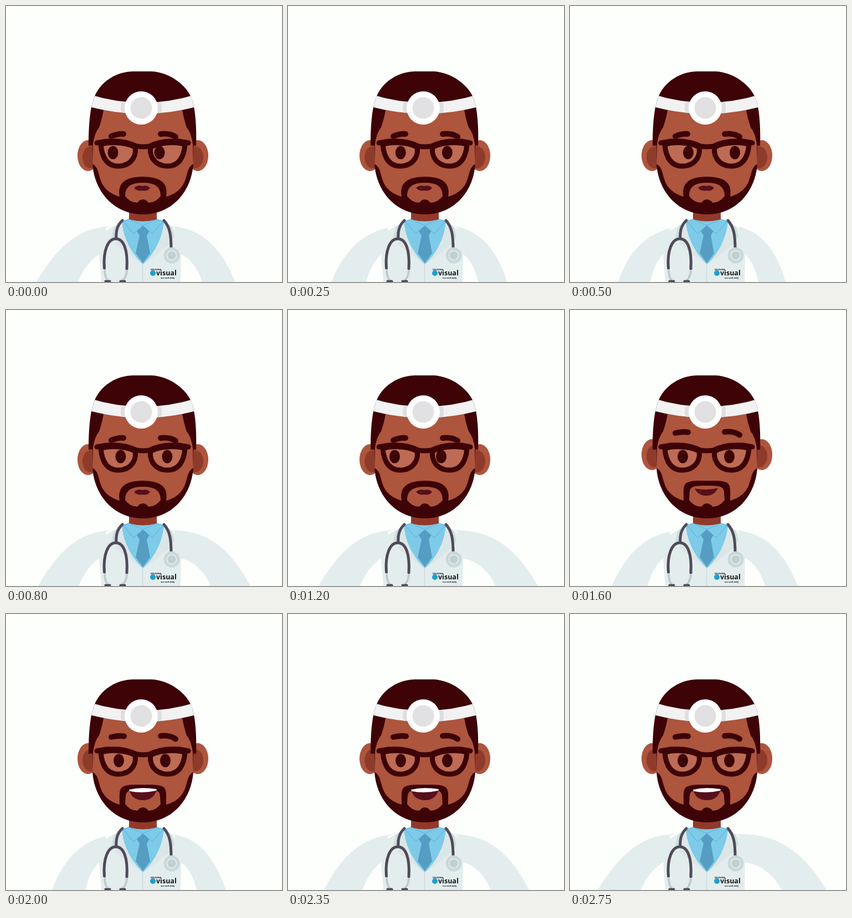
Write an HTML page that moves like this. It is 498 px wide and 498 px high and loops after 2.8 s.

```html
<!DOCTYPE html>
<html lang="en">
<head>
<meta charset="utf-8">
<title>Eye doctor</title>
<style>
  html, body { margin: 0; width: 100%; height: 100%; overflow: hidden; background: #fdfffd; }
  svg { display: block; width: 498px; height: 498px; }
  .coat { fill: #e4eded; }
  .lapel { fill: #dbe6e7; }
  .fold { fill: #cfdedf; }
  .bg { fill: #fdfffd; }
  .skin { fill: #ad553d; }
  .shade { fill: #8f3b2b; }
  .dark { fill: #3d0306; }
  .line { fill: none; stroke: #3d0306; stroke-linecap: round; stroke-linejoin: round; }
  .tube { fill: none; stroke: #504a59; stroke-width: 5; stroke-linecap: round; }
  text { font-family: "Open Sans", "Noto Sans", sans-serif; font-weight: 700; fill: #15181c; }
</style>
</head>
<body>
<svg viewBox="0 0 498 498">
  <defs>
    <clipPath id="headClip"><use href="#hair"/></clipPath>
    <clipPath id="bandClip"><use href="#band"/></clipPath>
    <clipPath id="mouthClip"><path id="mouthEdge"/></clipPath>
  </defs>

  <!-- body -->
  <path id="armL" class="coat"/>
  <path id="armR" class="coat"/>
  <path class="coat" d="M194 398L208 389H286L299 398L316 412V498H171L168 412Z"/>
  <path id="gapL" class="bg"/>
  <path id="gapR" class="bg"/>

  <!-- neck, shirt and tie -->
  <path fill="#7dcbe9" d="M209 390L222 384H272L285 389C282 420 268 447 247 466C226 446 212 420 209 390Z"/>
  <path fill="#93392a" d="M222 362H272V385Q247 392 222 385Z"/>
  <path fill="#559dc2" d="M233 402L247 396L261 402L254 414L260 446L247 464L234 446L241 414Z"/>
  <path fill="#7dcbe9" stroke="#62b0d3" d="M211 388L222 385L247 396L230 411ZM284 388L272 385L247 396L264 411Z"/>
  <path class="lapel" d="M208 389L195 398L190 417L201 421L197 429L246 467C226 446 212 420 208 389Z"/>
  <path class="lapel" d="M286 389L299 398L304 417L293 421L297 429L247 467C268 446 282 420 286 389Z"/>
  <path class="fold" d="M205 391L195 398L190 417L200 421Q198 404 205 391ZM289 391L299 398L304 417L295 421Q296 404 289 391Z"/>
  <path d="M246.500 466V498" stroke="#cbd8da" stroke-width="1.500"/>

  <!-- stethoscope -->
  <path class="tube" d="M210 387C201 395 198 407 199 420M177.500 473C175 441 184 420 198 420C213 420 220 441 218 474M285 387C296 399 298 415 298 438"/>
  <path fill="none" stroke="#bfcbd0" stroke-width="4" d="M178 475Q178 487 183 495M218 476Q218 487 211 495"/>
  <path class="tube" d="M180 497H187M207 497H214"/>
  <circle cx="299" cy="450" r="14.500" fill="#c9d8d9"/>
  <circle cx="299" cy="450" r="8.500" fill="#c0d1d3" stroke="#e0eaea" stroke-width="2"/>

  <!-- badge -->
  <circle cx="265" cy="482" r="5" fill="#1c9fd0"/>
  <text x="271" y="486" font-size="12.500">visual</text>
  <text x="261" y="477" font-size="4">VELDORA</text>
  <text x="279" y="492" font-size="3.800">see well daily</text>

  <!-- head -->
  <g id="ears">
    <ellipse class="skin" cx="148" cy="270" rx="19" ry="28"/>
    <ellipse class="skin" cx="346" cy="270" rx="19" ry="28"/>
    <ellipse class="shade" cx="153" cy="273" rx="15" ry="20"/>
    <ellipse class="shade" cx="341" cy="273" rx="15" ry="20"/>
  </g>
  <path id="hair" class="dark" d="M149 252C149 220 151 190 157 171C168 134 203 118 230 118H263C296 120 328 143 337 172C342 192 344 220 343 252Z"/>
  <path class="dark" d="M156 245H338V285C334 338 297 376 247 376C197 376 160 338 156 285Z"/>
  <path id="face" class="skin"/>
  <path id="patch" class="skin"/>
  <g clip-path="url(#headClip)">
    <path id="band" fill="#f2f2f3" d="M140 156Q247 193 354 156V179Q247 210 140 179Z"/>
    <circle cx="244" cy="184" r="37" fill="#dedee1" clip-path="url(#bandClip)"/>
  </g>
  <circle cx="244" cy="184" r="30" fill="#fefefe"/>
  <circle cx="244" cy="184" r="19.500" fill="#e1e1e4"/>

  <path id="brows" class="line" stroke-width="10"/>

  <!-- glasses and eyes -->
  <g id="lenses" fill="#bd6b54">
    <path d="M171 250C185 245 213 245 232 254C237 264 230 288 203 289C181 289 173 271 171 250Z"/>
    <path d="M323 250C309 245 281 245 262 254C257 264 264 288 291 289C313 289 321 271 323 250Z"/>
  </g>
  <g id="eyes" class="dark">
    <ellipse rx="9.500" ry="12" cy="264.500"/>
    <ellipse rx="9.500" ry="12" cx="84" cy="264.500"/>
  </g>
  <use href="#lenses" class="line" stroke-width="9" style="fill-opacity:0"/>
  <path class="line" stroke-width="9" d="M164 247L182 244Q215 242 235 253Q247 255 259 253Q279 242 312 244L329 247"/>

  <!-- mouth -->
  <path id="lips" fill="#57101b"/>
  <g clip-path="url(#mouthClip)">
    <path id="teeth" fill="#fdfdfd" d="M215 308H278V317Q247 326 215 318Z"/>
  </g>
</svg>

<script>
const LOOP = 2800, STEP = 50;
const $ = id => document.getElementById(id);
const draw = (id, d) => $(id).setAttribute('d', d);

// Blend two paths that share the same commands.
function mix(a, b, k) {
  const end = b.match(/-?[\d.]+/g);
  let i = 0;
  return a.replace(/-?[\d.]+/g, n => (+n + (end[i++] - n) * k).toFixed(2));
}

// Smooth curve through [time, value] keys, flat at turning points.
function curve(keys) {
  const slope = i => (keys[i + 1][1] - keys[i][1]) / (keys[i + 1][0] - keys[i][0]);
  const tangent = i => {
    if (!i || i === keys.length - 1) return 0;
    const a = slope(i - 1), b = slope(i);
    return a * b > 0 ? 2 * a * b / (a + b) : 0;
  };
  return t => {
    if (t >= keys[keys.length - 1][0]) return keys[keys.length - 1][1];
    const i = keys.findIndex(k => k[0] > t) - 1;
    const [t0, a] = keys[i], [t1, b] = keys[i + 1];
    const h = t1 - t0, s = (t - t0) / h, r = 1 - s;
    return a * (1 + 2 * s) * r * r + b * s * s * (3 - 2 * s)
      + h * s * r * (tangent(i) * r - tangent(i + 1) * s);
  };
}

const handL = curve([[0, 55], [400, 89], [500, 87], [800, 58], [1080, 51], [1200, 55],
  [1600, 76], [1850, 87], [2200, 73], [2350, 65], [2750, 50]]);
const handR = curve([[0, 414], [400, 387], [500, 389], [800, 441], [1050, 462], [1200, 451],
  [1600, 411], [1850, 388], [2200, 419], [2350, 435], [2750, 463]]);
const gaze = curve([[0, 193], [100, 193], [400, 213.5], [650, 213.5], [1050, 192.5], [1250, 192.5], [1500, 203.5]]);
const cheer = curve([[0, 0], [1250, 0], [1500, 1]]);
const open = curve([[0, 0], [1700, 0], [1950, 1]]);

const shape = {
  armL: ['M195 397C155 406 112 424 87 498L180 498L180 400Z', 'M195 397C150 397 104 410 50 498L180 498L180 400Z'],
  armR: ['M298 397C330 402 368 423 389 498L305 498L305 400Z', 'M298 397C345 397 405 401 463 498L305 498L305 400Z'],
  gapL: ['M168 448Q150 468 145 499L172 499Z', 'M168 448Q143 463 127 499L172 499Z'],
  gapR: ['M316 448Q332 462 340 499L315 499Z', 'M316 448Q360 455 382 499L315 499Z'],
  brows: ['M190 235Q202 230 212 231M279 231Q295 229 306 236', 'M190 222Q203 219 213 220.5M279 220Q295 218 306 225.5'],
  face: [
    'M176 188L318 188Q321 205 326 219Q335 230 337 250L338 285C328 290 327 303 324 312Q317 336 289 344C293 322 282 308 247 308C212 308 201 322 205 344Q177 336 170 312C167 303 166 290 156 285L157 250Q159 230 168 219Q173 205 176 188Z',
    'M176 188L318 188Q321 205 326 219Q335 230 337 250L338 285C328 290 327 303 324 312Q317 336 289 344C289 312 294 307 247 308C200 307 205 312 205 344Q177 336 170 312C167 303 166 290 156 285L157 250Q159 230 168 219Q173 205 176 188Z'],
  patch: [
    'M215 343C215 326 225 319 247 319C269 319 279 326 279 343Q270 355 257 355Q253 349 247 349Q241 349 237 355Q224 355 215 343Z',
    'M215 343C217 320 212 317 247 317C282 317 277 320 279 343Q270 355 257 355Q253 349 247 349Q241 349 237 355Q224 355 215 343Z']
};
const lips = [
  'M231 328Q239 322 246 325Q253 322 260 328Q256 335 246 333Q236 335 231 328Z',
  'M225 322Q236 324 246 324Q256 324 267 321Q261 335 246 335Q231 335 225 322Z',
  'M222 317Q235 314 247 314Q259 314 272 316Q267 336 247 336Q227 336 222 317Z'
];

function render(t) {
  const l = (87 - handL(t)) / 37, r = (handR(t) - 389) / 74;
  const c = cheer(t), o = open(t);
  const amount = { armL: l, gapL: l, armR: r, gapR: r, brows: c, face: c, patch: c };
  for (const id in shape) draw(id, mix(...shape[id], amount[id]));
  const mouth = o > 0 ? mix(lips[1], lips[2], o) : mix(lips[0], lips[1], c);
  draw('lips', mouth);
  draw('mouthEdge', mouth);
  $('teeth').setAttribute('opacity', o);
  $('eyes').setAttribute('transform', `translate(${gaze(t)} 0)`);
  $('ears').setAttribute('transform', `translate(0 ${-9 * c})`);
}

const start = performance.now();
function tick() {
  const t = (performance.now() - start) % LOOP;
  render(Math.floor(t / STEP) * STEP);
  requestAnimationFrame(tick);
}
tick();
</script>
</body>
</html>
```
